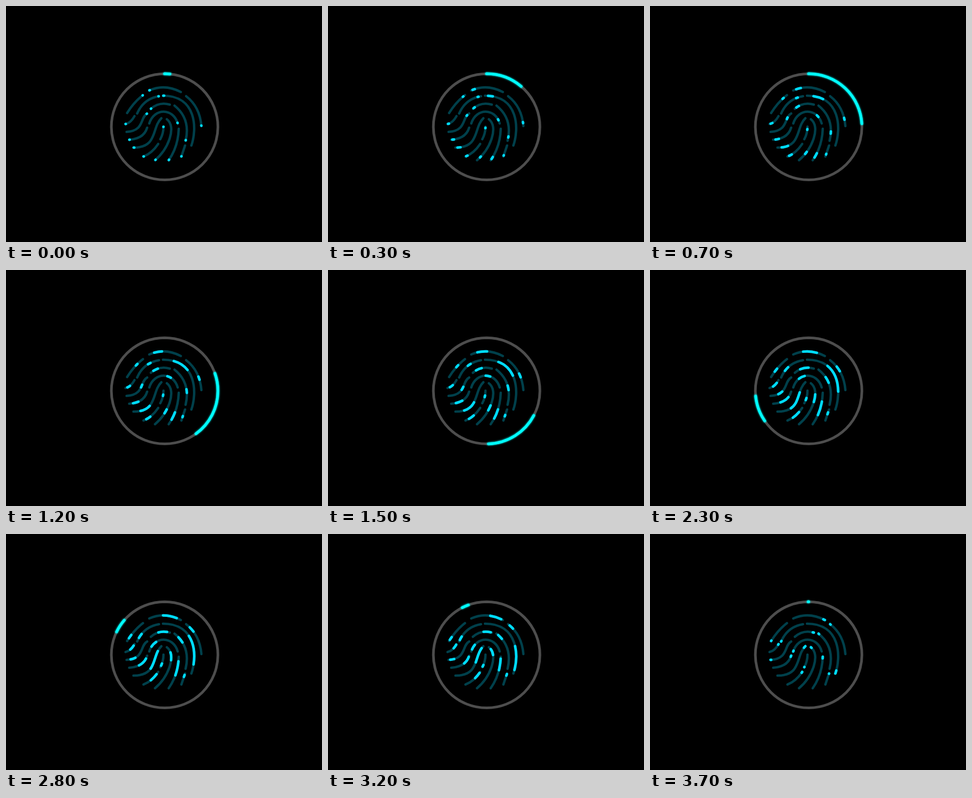
An HTML page for the animation above (3800 ms loop, 600 by 450 pixels).

```html
<!DOCTYPE html>
<html lang="en">
<head>
<meta charset="utf-8">
<title>Fingerprint scan</title>
<style>
  html, body { margin: 0; width: 100%; height: 100%; overflow: hidden; background: #000; }
  svg { display: block; width: 600px; height: 450px; }
  path { fill: none; stroke-linecap: round; stroke-linejoin: round; }
  .track { stroke: #4d4d4d; stroke-width: 5; }
  .base { stroke: #00404b; stroke-width: 4.6; }
  .scan { stroke: #00dcff; stroke-width: 5; }
  .glow { stroke: #00e5e5; stroke-width: 6.5; opacity: .75; filter: url(#blur); }
  .arc { stroke: #00ffff; stroke-width: 5.2; }
</style>
</head>
<body>
<svg viewBox="0 0 600 450">
  <defs>
    <filter id="blur" filterUnits="userSpaceOnUse" x="180" y="110" width="240" height="240">
      <feGaussianBlur stdDeviation="1.6"/>
    </filter>
  </defs>
</svg>
<script>
const LOOP = 3800, STEP = 100;
const svg = document.querySelector('svg');

const ring = 'M301.2 129.2a101.2 101.2 0 0 1 0 202.4a101.2 101.2 0 0 1 0-202.4';

// One curve per ridge, starting where its highlight enters
const longDash = [
  'M272 161Q301 148 332 164',
  'M298 171C362 171 363 234 352 266',
  'M227 225Q237 223 244 210',
  'M275 196Q291 182 311 188',
  'M234 255Q262 253 268 232',
  'M242 270C289 270 276 232 295 214',
  'M261 287Q277 281 289 263',
  'M309 294Q327 268 328 234'
];
const shortDash = [
  'M260 170Q243 183 230 204',
  'M290.5 172Q261 177 249 205',
  'M268 205C254 213 263 238 229 240',
  'M326 224C318 195 282 193 272 224',
  'M371 229Q368 192 342 172',
  'M341 257Q351 215 320 190',
  'M299 230Q299 243 293 254',
  'M283 294C309 272 324 230 305.5 216',
  'M333 287L340 266'
];

function addPath(d, cls) {
  const p = document.createElementNS('http://www.w3.org/2000/svg', 'path');
  p.setAttribute('d', d);
  p.setAttribute('class', cls);
  p.setAttribute('pathLength', 1);
  svg.append(p);
  return p;
}

function trim(p, from, to) {
  p.setAttribute('stroke-dasharray', `${Math.max(to - from, .001)} 2`);
  p.setAttribute('stroke-dashoffset', -from);
}

addPath(ring, 'track');
[...longDash, ...shortDash].forEach(d => addPath(d, 'base'));
const addScan = d => addPath(d, 'scan');
const longScans = longDash.map(addScan), shortScans = shortDash.map(addScan);
const arcs = ['glow', 'arc'].map(cls => addPath(ring, cls));

// Nearly steady, slowing towards the end
function headAt(t) {
  const u = t / 3700;
  return Math.min(1, .016 + u * (1.185 - .2 * u ** 4));
}

function draw(now) {
  const t = Math.floor(now % LOOP / STEP) * STEP;
  const head = headAt(t);
  // Dash length is a share of the distance covered; it closes late in the loop
  const open = 1 - (t / 3750) ** 6;
  const show = (paths, share) =>
    paths.forEach(p => trim(p, head * (1 - share * open), head));
  show(longScans, .6);
  show(shortScans, .23);
  show(arcs, Math.exp(-Math.max(0, t - 700) / 740));
}

const start = performance.now();
function tick() {
  draw(performance.now() - start);
  requestAnimationFrame(tick);
}
tick();
</script>
</body>
</html>
```
